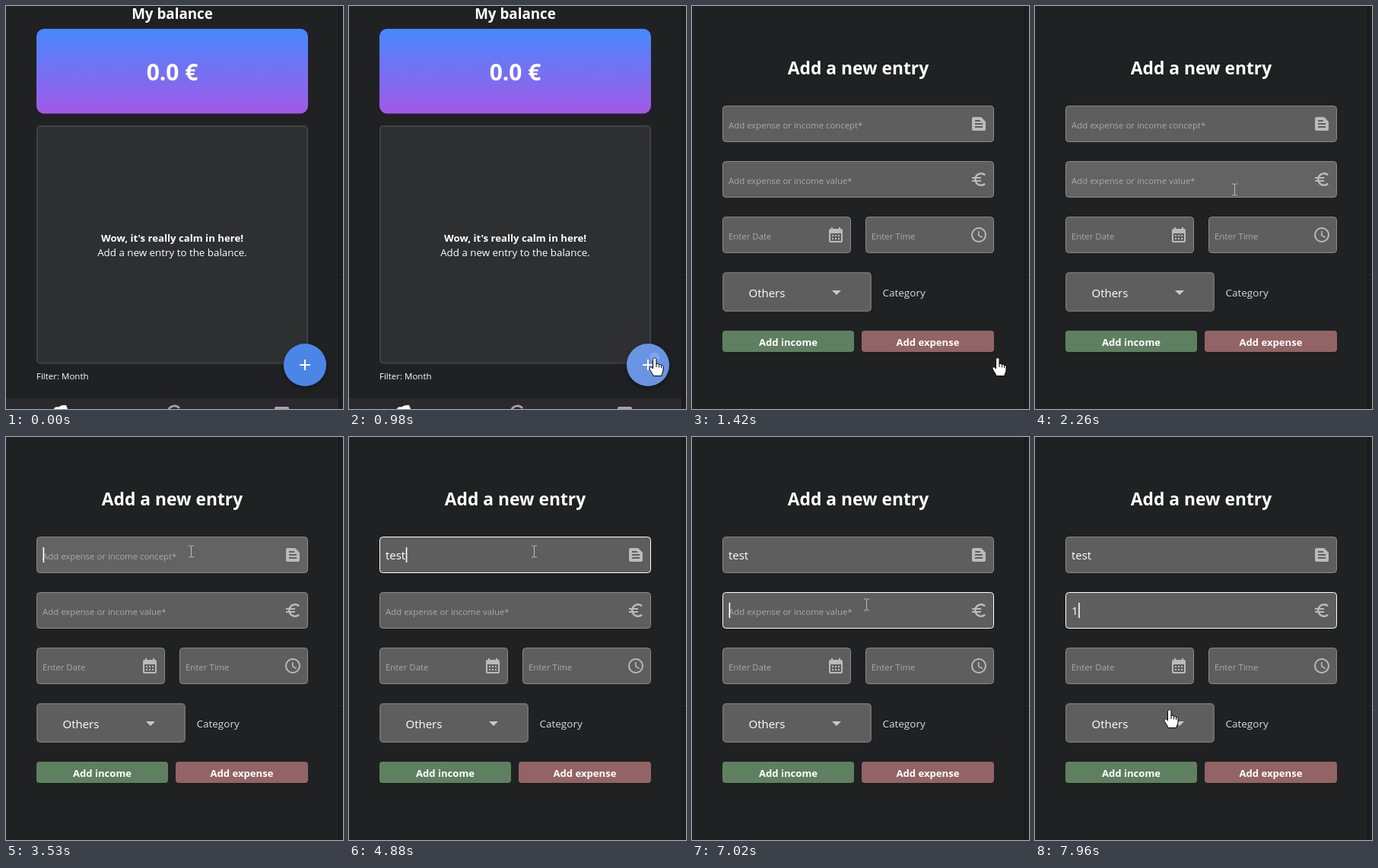
Animation, 443 px wide and 530 px high, one loop 8 s. Source, as an HTML page:

```html
<!DOCTYPE html>
<html lang="en">
<head>
<meta charset="utf-8">
<title>Balance entry</title>
<style>
  html, body { margin: 0; width: 100%; height: 100%; overflow: hidden; background: #1f2122; }
  svg { display: block; width: 443px; height: 530px; }
  text { font-family: "Open Sans", "Noto Sans", sans-serif; fill: #fff; white-space: pre; }
  .bold { font-weight: 700; }
  .mid { text-anchor: middle; }
  .hint { font-size: 11.4px; fill: #a9a9a9; }
  .value { font-size: 15px; }
  .field { fill: #5e5e5e; stroke: #8b8b8b; }
  .icon { fill: #bababa; }
  .line { fill: none; stroke: #bababa; }
</style>
</head>
<body>
<svg id="stage" viewBox="0 0 443 530"></svg>
<script>
const LOOP = 8000;
const OPEN = 1050, OPEN_MS = 300;

// [time, x, y] of the pointer's hot spot
const track = [
  [0, 394, 540], [60, 394, 538], [440, 401, 468], [670, 401, 468], [880, 402, 463],
  [1520, 402, 463], [2260, 262, 241], [2360, 262, 241], [3060, 243, 150],
  [5330, 243, 150], [6110, 229, 220], [7160, 229, 220], [7950, 177, 359]
];
const typed = {
  concept: [[0, ''], [4240, 't'], [4490, 'te'], [4770, 'tes'], [4870, 'test']],
  value: [[0, ''], [7070, '1']]
};
const caretOn = [[3530, 3940], [4240, 5330], [5830, 6110], [6330, 6920], [7020, LOOP]];

const boxes = {
  concept: [40, 131, 357, 48], value: [40, 204, 357, 48],
  date: [40, 277, 169, 48], time: [228, 277, 169, 48],
  category: [40, 350, 196, 52], income: [40, 427, 173, 28], expense: [223, 427, 174, 28]
};

const rect = (x, y, w, h, r, attrs) =>
  `<rect x="${x}" y="${y}" width="${w}" height="${h}" rx="${r}" ${attrs}/>`;
const text = (x, y, size, str, cls = '', attrs = '') =>
  `<text x="${x}" y="${y}" font-size="${size}" class="${cls}" ${attrs}>${str}</text>`;
const icon = (x, y, body) => `<g transform="translate(${x - 12} ${y - 12})">${body}</g>`;

function field(name, hint) {
  const [x, y, w, h] = boxes[name];
  return rect(x + .5, y + .5, w - 1, h - 1, 4, `id="${name}" class="field"`)
    + text(x + 8, y + 30, 11.4, hint, 'hint', `id="${name}Hint"`)
    + `<text x="${x + 8}" y="${y + 30}" class="value" id="${name}Text"></text>`;
}

function button(name, label, color) {
  const [x, y, w, h] = boxes[name];
  return rect(x, y + 1, w, h, 4, 'fill="#000" opacity=".25"')
    + rect(x, y, w, h, 4, `fill="${color}"`)
    + text(x + w / 2, y + 20, 13.1, label, 'bold mid');
}

const docIcon = `<path class="icon" fill-rule="evenodd" d="M5 3H14.2Q15 3 15.6 3.6L20.4 8.4Q21 9 21 9.8V19Q21 21 19 21H5Q3 21 3 19V5Q3 3 5 3Z
  M7 7V9H14V7ZM7 11V13H17V11ZM7 15V17H17V15Z"/>`;
const euroIcon = `<path class="line" stroke-width="2.5" d="M20.1 6.2A7.75 7.75 0 1 0 20.1 17.8"/>
  <path class="line" stroke-width="2" d="M3 10H15M3 14H15"/>`;
const dots = [12, 16].map(y => [7, 11, 15].map(x => `M${x} ${y}h2v2h-2z`).join('')).join('');
const dateIcon = `<path class="icon" fill-rule="evenodd" d="M6 2H8V4H16V2H18V4H19Q21 4 21 6V20Q21 22 19 22H5Q3 22 3 20V6Q3 4 5 4H6Z
  M5 10V20H19V10Z"/><path class="icon" d="${dots}"/>`;
const clockIcon = `<circle class="line" cx="12" cy="12" r="9" stroke-width="2"/>
  <path class="line" stroke-width="1.6" d="M11.8 7V12.6L16.6 15.5"/>`;

const home = rect(0, 0, 437, 530, 0, 'fill="#1f2122"')
  + text(218.5, 17, 18.8, 'My balance', 'bold mid')
  + rect(40, 30, 357, 111.5, 10, 'fill="url(#sky)"')
  + text(218.5, 98, 30, '0.0 €', 'bold mid')
  + rect(41, 158, 355, 311.5, 4, 'fill="#2e2f31" stroke="#404143" stroke-width="2"')
  + text(218.5, 310, 13.2, 'Wow, it\'s really calm in here!', 'bold mid')
  + text(218.5, 329, 13.36, 'Add a new entry to the balance.', 'mid')
  + text(40, 491, 11.5, 'Filter: Month')
  + rect(0, 516, 437, 14, 0, 'fill="#2a2a2e"')
  + '<path fill="#fff" d="M63 530Q64 526.5 69 527.5Q72 525 75 525H79.500V527Q81 528 81 530Z"/>'
  + '<path fill="none" stroke="#a9a1b6" stroke-width="2.600" d="M213.500 532A8 7 0 0 1 228 529"/>'
  + rect(353, 527, 19, 8, 2, 'fill="#a9a1b6"')
  + `<circle cx="393" cy="472" r="28" fill="#4c86e7" id="fab" filter="url(#soft)"/>
     <circle cx="402" cy="462" r="0" fill="#fff" id="ripple" clip-path="url(#fabClip)"/>
     <path d="M386 472H400M393 465V479" stroke="#fff" stroke-width="2"/>`;

const form = rect(0, 0, 437, 530, 0, 'fill="#1f2122"')
  + text(218.5, 90, 22.8, 'Add a new entry', 'bold mid')
  + field('concept', 'Add expense or income concept*') + icon(377, 155, docIcon)
  + field('value', 'Add expense or income value*') + icon(377, 228, euroIcon)
  + field('date', 'Enter Date') + icon(189, 301, dateIcon)
  + field('time', 'Enter Time') + icon(377, 301, clockIcon)
  + rect(41, 351, 194, 50, 4, 'fill="#5e5e5e" stroke="#6e6e6e" stroke-width="2"')
  + text(74.5, 383, 15, 'Others')
  + '<path d="M184 374H196L190 380Z" fill="#c9c9c9"/>'
  + text(250.500, 382, 13.5, 'Category', '', 'style="fill:#d9d9d9"')
  + button('income', 'Add income', '#5f8060')
  + button('expense', 'Add expense', '#936465')
  + '<rect id="caret" width="1.600" height="20" fill="#fff"/>';

const pointers = `
  <g id="hand" stroke="#000" stroke-width="1" stroke-linejoin="round">
    <path fill="#fff" d="M-2.500 1.500C-2.500-.7 2-.7 2 1.500V8C2 6.800 5.500 6.800 5.500 9C5.500 7.800 8.500 8 8.500 10
      C8.500 9 11 9.300 11 11.500V16C11 19 9 20 9 23.500H-2C-2 21-7 16-7 13.500C-7 11-4 11.500-2.500 14Z"/>
    <path fill="none" d="M2 8V12M5.500 9V12.500M8.500 10V13"/>
  </g>
  <path id="beam" fill="none" stroke="#bdbdbd" d="M-3.500-7.500H-1L0-6.500L1-7.500H3.500M0-6.500V6.500M-3.500 7.500H-1L0 6.500L1 7.500H3.500"/>
  <path id="arrow" fill="#fff" stroke="#000" d="M0 0V16.500L3.800 13L6.300 18.800L8.700 17.800L6.300 12H11.500Z"/>`;

const stage = document.getElementById('stage');
stage.innerHTML = `
  <defs>
    <linearGradient id="sky" x2="0" y2="1"><stop stop-color="#4689ff"/><stop offset="1" stop-color="#a259e6"/></linearGradient>
    <filter id="soft" x="-30%" y="-30%" width="160%" height="160%">
      <feDropShadow dx="0" dy="3" stdDeviation="3.500" flood-color="#000" flood-opacity=".4"/>
    </filter>
    <clipPath id="page"><rect width="437" height="530"/></clipPath>
    <clipPath id="fabClip"><circle cx="393" cy="472" r="28"/></clipPath>
  </defs>
  <g clip-path="url(#page)">
    <g id="home">${home}</g>
    <rect id="scrim" width="437" height="530" fill="#000"/>
    <g id="form">${form}</g>
  </g>
  <rect x="437" width="6" height="530" fill="#1c1d1e"/>
  <path d="M437.500 0V530" stroke="#161718"/>
  <path d="M438 353.500H443" stroke="#2b2c2d"/>
  <g id="pointer">${pointers}</g>`;

const el = {};
stage.querySelectorAll('[id]').forEach(e => el[e.id] = e);
const set = (id, attrs) => { for (const k in attrs) el[id].setAttribute(k, attrs[k]); };
const show = (id, on) => { el[id].style.display = on ? '' : 'none'; };

const clamp = v => Math.min(1, Math.max(0, v));
const span = (t, a, b) => clamp((t - a) / (b - a));
const mix = (a, b, p) => a + (b - a) * p;
const grey = v => `rgb(${v},${v},${v})`;

function pointerAt(t) {
  const i = track.findIndex(k => k[0] > t);
  if (i < 0) return track.at(-1).slice(1);
  const [t0, x0, y0] = track[i - 1], [t1, x1, y1] = track[i];
  const p = .5 - .5 * Math.cos(Math.PI * span(t, t0, t1));
  return [mix(x0, x1, p), mix(y0, y1, p)];
}

// fast start, long settling tail
function zoom(p) {
  return p < 1 / 6 ? .4 * (p * 6) ** 2 : 1 - .6 * (1 - (p - 1 / 6) * 1.2) ** 5;
}

const scaled = s => `translate(${218.5 * (1 - s)} ${265 * (1 - s)}) scale(${s})`;

function drawPages(t, overFab) {
  const p = span(t, OPEN, OPEN + OPEN_MS), z = zoom(p);
  show('home', p < 1);
  show('form', p > 0);
  set('home', { transform: scaled(1 + .05 * z) });
  set('form', { transform: scaled(mix(.85, 1, z)), opacity: span(p, .125, .25) });
  set('scrim', { opacity: p < 1 ? .6 * span(p, 0, .45) : 0 });
  set('fab', { fill: overFab ? '#6894e3' : '#4c86e7' });
  set('ripple', { r: t < 940 ? 0 : mix(2, 40, span(t, 940, 1300)), opacity: .18 });
}

function drawField(name, t, focus, hovered) {
  const steps = typed[name];
  const str = steps.filter(s => s[0] <= t).at(-1)[1];
  el[name + 'Text'].textContent = str;
  set(name + 'Hint', { opacity: 1 - span(t, steps[1][0], steps[1][0] + 120) });
  el[name].style.stroke = grey(Math.round(mix(139, 255, focus)));
  el[name].style.fill = grey(hovered && focus < .5 ? 99 : 94);
}

function drawPointer(t, x, y, over, overFab) {
  const waiting = t >= OPEN && t < 1530;
  const kind = t < OPEN ? (overFab ? 'hand' : 'arrow')
    : waiting || ['category', 'income', 'expense'].includes(over) ? 'hand'
    : over ? 'beam' : 'arrow';
  ['hand', 'beam', 'arrow'].forEach(k => show(k, k === kind));
  const snap = v => kind === 'beam' ? Math.floor(v) + .5 : v;
  set('pointer', { transform: `translate(${snap(x)} ${snap(y)})` });
}

function draw(t) {
  const [x, y] = pointerAt(t);
  const overFab = Math.hypot(x - 393, y - 472) < 28;
  const over = Object.keys(boxes).find(k => {
    const [bx, by, w, h] = boxes[k];
    return x >= bx && x <= bx + w && y >= by && y <= by + h;
  });
  drawPages(t, overFab);
  const second = span(t, 6230, 6400);
  drawField('concept', t, span(t, 3530, 3770) * (1 - second), over === 'concept');
  drawField('value', t, second, over === 'value');

  const active = t < 6230 ? 'concept' : 'value';
  show('caret', caretOn.some(([a, b]) => t >= a && t < b));
  set('caret', {
    x: 48.6 + el[active + 'Text'].getComputedTextLength(),
    y: boxes[active][1] + 14
  });
  drawPointer(t, x, y, over, overFab);
}

function tick() {
  draw(performance.now() % LOOP);
  requestAnimationFrame(tick);
}
tick();
</script>
</body>
</html>
```
